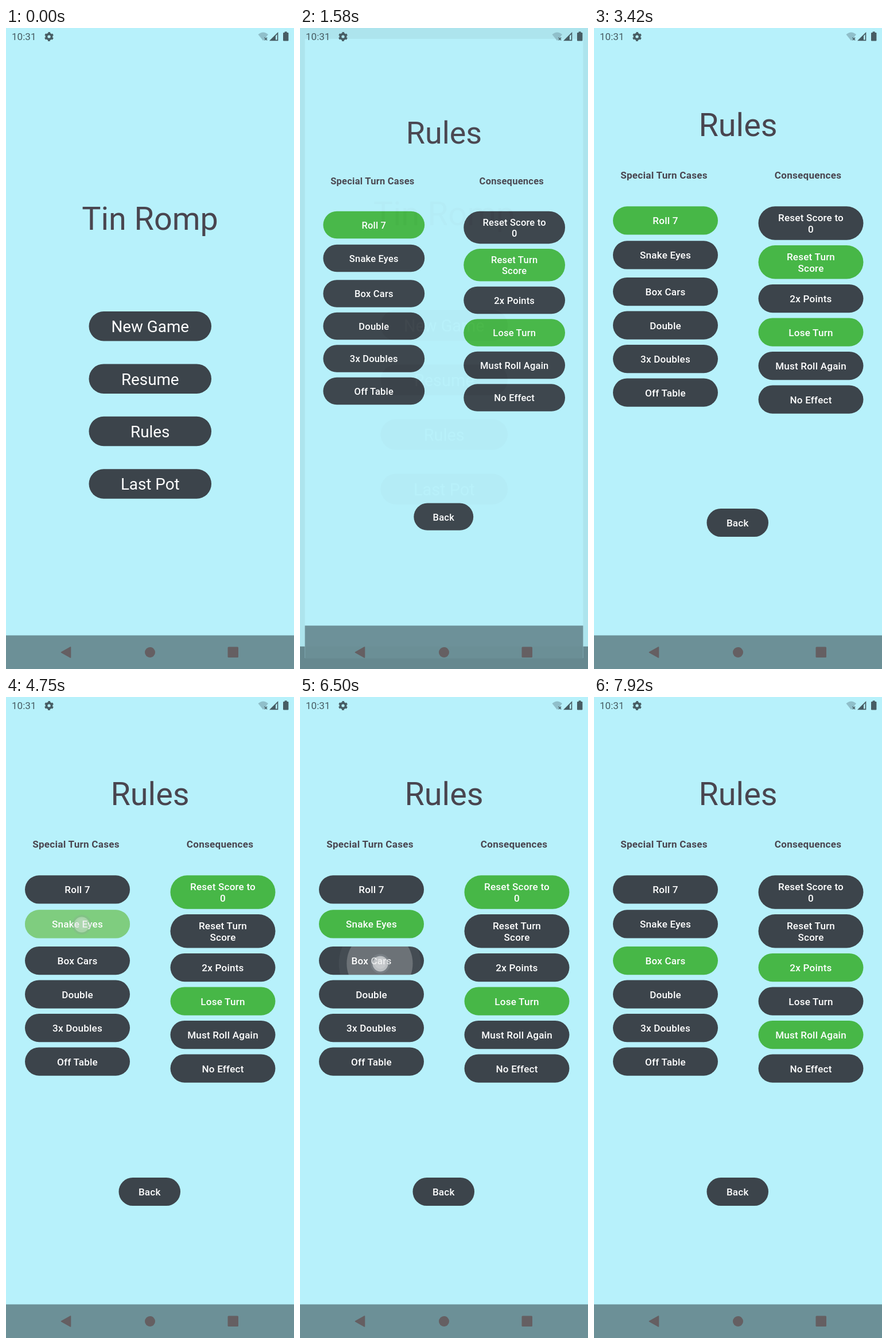
Write an HTML page that moves like this. It is 502 px wide and 1115 px high and loops after 8 s.

```html
<!DOCTYPE html>
<html lang="en">
<head>
<meta charset="utf-8">
<title>Dice game menu</title>
<style>
html, body { margin: 0; width: 100%; height: 100%; overflow: hidden; background: #b7f1fb; }
svg { display: block; width: 502px; height: 1115px; font-family: Roboto, sans-serif; }
</style>
</head>
<body>
<svg id="stage" viewBox="0 0 502 1115"></svg>
<script>
const stage = document.getElementById('stage');
const LOOP = 8000, STEP = 1000 / 12;
const DARK = '#3c444b', GREEN = '#47b747', INK = '#49454f', ICON = '#475c63';
const OPEN = 1583; // first moment the rules screen is visible

const taps = [
  { at: 995, x: 241, y: 697, label: 'Rules' },
  { at: 4510, x: 132, y: 396, label: 'Snake Eyes' },
  { at: 6465, x: 140, y: 464, label: 'Box Cars' }
];
const CLICK = 200; // press to release

const cases = [['Roll 7', 310.3], ['Snake Eyes', 370.3], ['Box Cars', 434], ['Double', 492.5],
  ['3x Doubles', 551], ['Off Table', 609.5]];
const effects = [['Reset Score to|0', 310.3, 58.5], ['Reset Turn|Score', 378, 58.5], ['2x Points', 446],
  ['Lose Turn', 504.5], ['Must Roll Again', 563], ['No Effect', 621.5]];
const chosen = [
  ['Roll 7', 'Reset Turn|Score', 'Lose Turn'],
  ['Snake Eyes', 'Reset Score to|0', 'Lose Turn'],
  ['Box Cars', '2x Points', 'Must Roll Again']
];

const clamp = v => Math.max(0, Math.min(1, v));
const smooth = v => v * v * (3 - 2 * v);
const rect = (x, y, w, h, fill, r = 0) =>
  `<rect x="${x}" y="${y}" width="${w}" height="${h}" rx="${r}" fill="${fill}"/>`;
const circle = (x, y, r, fill, alpha = 1) =>
  `<circle cx="${x}" cy="${y}" r="${r}" fill="${fill}" fill-opacity="${alpha}"/>`;
const text = (s, x, y, size, fill, weight = 400, gap = 0) =>
  `<text x="${x}" y="${y}" font-size="${size}" fill="${fill}" font-weight="${weight}" letter-spacing="${gap}" text-anchor="middle">${s}</text>`;

function ripple(tap, t, x, y, w, h) {
  const age = t - tap.at;
  if (age < 0 || age > 460) return '';
  const u = clamp(age / 225), e = smooth(u);
  const r0 = w * 0.3, r = r0 + (Math.hypot(w, h) / 2 - r0) * e;
  const cx = tap.x + (x + w / 2 - tap.x) * e, cy = tap.y + (y + h / 2 - tap.y) * e;
  const alpha = 0.3 * clamp(age / 50) * clamp((460 - age) / 200);
  return `<clipPath id="pill">${rect(x, y, w, h, '#000', h / 2)}</clipPath><g clip-path="url(#pill)">` +
    circle(cx, cy, r * 1.24, '#fff', alpha * 0.25 * (1 - u)) + circle(cx, cy, r, '#fff', alpha) + '</g>';
}

function button(label, x, y, w, h, t, on, size = 17.09, weight = 500, gap = 0.2) {
  const lines = label.split('|'), tap = taps.find(p => p.label === label);
  const base = y + h / 2 + size * 0.355 + 0.5 - (lines.length - 1) * 10;
  return rect(x, y, w, h, on ? GREEN : DARK, h / 2) + (tap ? ripple(tap, t, x, y, w, h) : '') +
    lines.map((s, i) => text(s, x + w / 2, base + i * 20, size, '#fff', weight, gap)).join('');
}

const backdrop = rect(0, 0, 502, 1115, '#b7f1fb') + rect(0, 1056.5, 502, 58.5, '#6c9097');

function menu(t) {
  return backdrop + text('Tin Romp', 251, 351.3, 55.7, INK) +
    ['New Game', 'Resume', 'Rules', 'Last Pot'].map((s, i) =>
      button(s, 144.5, 493 + i * 91.4, 213.5, 51.5, t, false, 27.8, 400, 0)).join('');
}

function rules(t) {
  const picked = chosen[taps.slice(1).filter(p => t >= p.at + CLICK).length];
  const column = (list, x) => list.map(([s, y, h = 49.2]) =>
    button(s, x, y, 183, h, t, picked.includes(s))).join('');
  return backdrop + text('Rules', 251, 188.3, 55.8, INK) +
    text('Special Turn Cases', 122, 262, 17.09, INK, 700, 0.25) +
    text('Consequences', 373, 262, 17.09, INK, 700, 0.25) +
    column(cases, 33) + column(effects, 286.5) +
    button('Back', 196.5, 836, 107.5, 49, t, false);
}

const zoom = (s, alpha, body) =>
  `<g transform="translate(251 557.5) scale(${s}) translate(-251 -557.5)" opacity="${alpha}">${body}</g>`;

function pointer(t) {
  return taps.map(p => {
    const age = t - p.at;
    if (age < 0 || age > 300) return '';
    const a = clamp((300 - age) / 100);
    return circle(p.x, p.y, 17, '#8d959a', 0.35 * a) + circle(p.x, p.y, 13.5, '#fff', 0.5 * a) +
      circle(p.x, p.y - 1, 10, '#fff', 0.15 * a);
  }).join('');
}

const system = `<text x="10" y="21" font-size="17.1" fill="${ICON}">10:31</text>
  <g fill="none" stroke="${ICON}">
    <circle cx="75" cy="15" r="4.5" stroke-width="3.8"/>
    <circle cx="75" cy="15" r="6.8" stroke-width="2.4" stroke-dasharray="3.6 3.52" stroke-dashoffset="-1.78"/>
  </g>
  <path d="M448.3 22.3L439.5 11.2Q448.3 3.6 457 11.2Z" fill="#90bfca"/>
  <path d="M450.7 16.8l4.4 4.4m0-4.4l-4.4 4.4" stroke="${ICON}" stroke-width="1.6"/>
  <path d="M459 22.3L474.3 7V22.3Z" fill="${ICON}"/>
  <path d="M470 13.7L472.6 11V20.6H470Z" fill="#b7f1fb"/>
  ${rect(483, 8, 9.4, 14.5, ICON, 1.2)}${rect(485.7, 6.3, 4, 3, ICON)}
  <path d="M96.5 1086L112.5 1077V1095Z" fill="#655f62" stroke="#655f62" stroke-width="1.6" stroke-linejoin="round"/>
  ${circle(251, 1086, 9, '#655f62')}${rect(386.5, 1076.5, 18.5, 18.5, '#655f62', 1.5)}`;

function scene(t) {
  if (t < OPEN) return menu(t) + pointer(t) + system;
  const left = 0.23 * 4 ** ((OPEN - t) / STEP);
  if (left < 0.001) return rules(t) + pointer(t) + system;
  const f = 1 - left;
  return zoom(1 + 0.05 * f, 1, menu(t)) +
    `<rect width="502" height="1115" opacity="${0.07 * f}"/>` +
    zoom(1 - 0.15 * left, clamp((t - 1535) / 50), rules(t)) + system;
}

let shown = -1, start;
function tick(now) {
  start ??= now;
  const step = Math.floor(((now - start) % LOOP + 5) / STEP) % 96;
  if (step !== shown) stage.innerHTML = scene((shown = step) * STEP + 0.5);
  requestAnimationFrame(tick);
}
requestAnimationFrame(tick);
</script>
</body>
</html>
```
